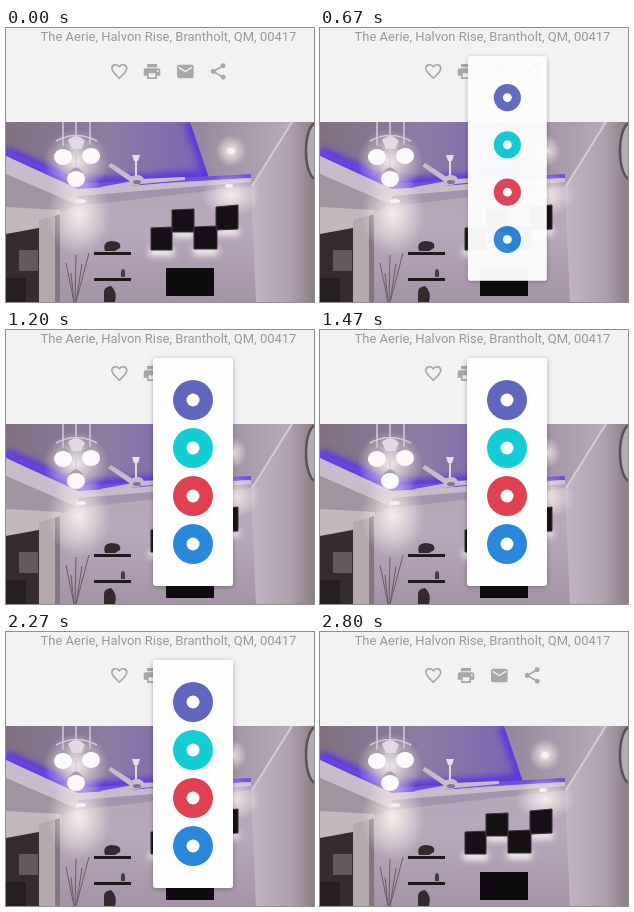
Write an HTML page that moves like this. It is 308 by 274 pixels and loops after 2.87 s.

```html
<!DOCTYPE html>
<html lang="en">
<head>
<meta charset="utf-8">
<title>Share menu</title>
<style>
  html, body { margin: 0; width: 100%; height: 100%; overflow: hidden; background: #f2f2f2; }
  svg { display: block; width: 308px; height: 274px; }
  text { font: 13px Roboto, sans-serif; fill: #999; }
  .line { fill: none; stroke: currentColor; stroke-width: 2; }
</style>
</head>
<body>
<svg viewBox="0 0 308 274">
  <defs>
    <clipPath id="photoArea"><path d="M0 94H308V274H0z"/></clipPath>
    <clipPath id="trayArea"><path d="M0 94H184L203 150L72 164L0 128z"/></clipPath>
    <filter id="soft" x="-40%" y="-100%" width="180%" height="300%"><feGaussianBlur stdDeviation="3"/></filter>
    <filter id="shadow" x="-20%" y="-10%" width="140%" height="120%">
      <feDropShadow dx="0" dy="1" stdDeviation="2.5" flood-opacity=".3"/>
    </filter>
    <linearGradient id="wall" x2="0" y2="1">
      <stop stop-color="#b3a3b5"/><stop offset=".6" stop-color="#b8a8bb"/><stop offset="1" stop-color="#a493a6"/>
    </linearGradient>
    <linearGradient id="ceiling">
      <stop stop-color="#94859b"/><stop offset="1" stop-color="#b9abb9"/>
    </linearGradient>
    <linearGradient id="tray">
      <stop stop-color="#807080"/><stop offset=".5" stop-color="#8d7ca3"/><stop offset="1" stop-color="#7864b4"/>
    </linearGradient>
    <linearGradient id="side">
      <stop stop-color="#c3b5c5"/><stop offset=".6" stop-color="#b0a1ae"/><stop offset="1" stop-color="#8d7f86"/>
    </linearGradient>
    <radialGradient id="glow">
      <stop stop-color="#fff6f0" stop-opacity=".9"/><stop offset="1" stop-color="#fff6f0" stop-opacity="0"/>
    </radialGradient>
  </defs>

  <rect width="308" height="274" fill="#f2f2f2"/>
  <text x="162.5" y="13" text-anchor="middle">The Aerie, Halvon Rise, Brantholt, QM, 00417</text>

  <g color="#a8a8a8" fill="currentColor">
    <path class="line" transform="translate(113.3 43.5) scale(.83) translate(-12 -12)"
      d="M12 20C6 14.6 3 11.8 3 8.4C3 3.6 9 2.3 12 6.2C15 2.3 21 3.6 21 8.4C21 11.8 18 14.6 12 20z"/>
    <path transform="translate(146 43.5) scale(.83) translate(-12 -12)" fill-rule="evenodd"
      d="M6 3H18V7H6zM5 8H19Q22 8 22 11V17H18V21H6V17H2V11Q2 8 5 8zM8 14V19H16V14zM18 10.5H20V12.5H18z"/>
    <path transform="translate(179.3 43.5) scale(.83) translate(-12 -12)" fill-rule="evenodd"
      d="M4 4H20Q22 4 22 6V18Q22 20 20 20H4Q2 20 2 18V6Q2 4 4 4zM4 6V8L12 13L20 8V6L12 11z"/>
  </g>
  <g id="shareIcon" fill="currentColor" transform="translate(212.2 43.5) scale(.83) translate(-12 -12)">
    <path class="line" d="M18 5L6 12L18 19"/>
    <circle cx="18" cy="5" r="3"/><circle cx="6" cy="12" r="3"/><circle cx="18" cy="19" r="3"/>
  </g>

  <g clip-path="url(#photoArea)">
    <path d="M0 94H308V274H0z" fill="url(#wall)"/>
    <path d="M184 94H286L245 158V148L203 150z" fill="url(#ceiling)"/>
    <path d="M0 94H184L203 150L72 164L0 128z" fill="url(#tray)"/>
    <g clip-path="url(#trayArea)">
      <path d="M0 124L72 156L203 148L184 94" fill="none" stroke="#5f38dc" stroke-width="12" filter="url(#soft)"/>
    </g>
    <path d="M0 124L68 154" stroke="#6a42e6" stroke-width="4"/>
    <path d="M66 158L245 148" stroke="#7350dc" stroke-width="4"/>
    <path d="M0 128L72 161L245 150V156L72 177L0 146z" fill="#c8bbcb"/>
    <path d="M72 168L245 154V158L72 178z" fill="#a393ad"/>
    <path d="M0 146L72 177L55 184L0 180z" fill="#a2949f"/>
    <path d="M0 179L55 182V194L0 206z" fill="#c4b8bf"/>
    <path d="M286 94H308V274H250L245 160z" fill="url(#side)"/>
    <path d="M286 94L246 158" stroke="#d6cad6" stroke-width="2"/>

    <path d="M0 206L33 200V274H0z" fill="#352c2e"/>
    <path d="M13 222H32V243H13z" fill="#655a5b"/>
    <path d="M0 250H20V274H0z" fill="#251f20"/>
    <path d="M33 192L54 186V274H33z" fill="#b5a9b0"/>
    <path d="M49 188L54 186V274H49z" fill="#85777d"/>

    <g fill="url(#glow)">
      <ellipse cx="73" cy="186" rx="32" ry="42"/>
      <ellipse cx="225" cy="167" rx="30" ry="22"/>
      <circle cx="225" cy="123" r="16"/>
      <circle cx="70" cy="134" r="33"/>
    </g>
    <g fill="#f8f1f4">
      <path filter="url(#soft)" d="M143 220H168V228H143zM166 202H189V209H166zM187 219H212V227H187zM209 200H233V207H209z"/>
      <ellipse cx="225" cy="123" rx="4" ry="3"/>
      <ellipse cx="223" cy="158" rx="4" ry="2"/>
      <ellipse cx="75" cy="173" rx="5" ry="2"/>
    </g>
    <path d="M145 200L166 199V222H145zM166 182L188 181V204H166zM188 199L211 198V221H188zM210 179L232 177V201L210 202z"
      fill="#161115" stroke="#39313a"/>

    <path d="M88 224H125V227H88zM88 250H125V253H88z" fill="#1f191d"/>
    <path d="M99 223Q96 214 105 213Q116 213 114 220L109 223zM98 274V264Q98 259 105 258Q112 264 109 274z" fill="#332a30"/>
    <path d="M115 249V243Q117 239 119 243V249z" fill="#463b42"/>
    <path d="M68 274L60 235M69 274L70 227M70 274L83 225M70 274L76 236M68 274L65 245"
      fill="none" stroke="#6b5c64" stroke-width="1"/>

    <path d="M160 240H208V268H160z" fill="#0f0c10"/>

    <path d="M130 128V150" stroke="#e0d9e4" stroke-width="2"/>
    <path d="M130 151L105 135L102 138L126 155zM128 153L94 159L100 162L130 157zM134 151L179 149V152L135 156z" fill="#c6bbca"/>
    <path d="M126 127H134L132 133H128z" fill="#e5dee8"/>
    <ellipse cx="131" cy="152" rx="7" ry="5" fill="#c7bdcb"/>
    <ellipse cx="131" cy="154" rx="4" ry="2" fill="#81758a"/>

    <path d="M57 94V122M70 94V143M84 94V121M50 113Q70 102 91 113" fill="none" stroke="#d5ccd6" stroke-width="1.5"/>
    <path d="M50 123Q57 112 64 123zM77 122Q84 111 91 122zM63 145Q70 134 77 145z" fill="#aa9fad"/>
    <path d="M62 112Q71 104 79 113L75 121H66z" fill="#e1dae3"/>
    <g fill="#fbf9fb">
      <ellipse cx="57" cy="129" rx="9" ry="8"/><ellipse cx="85" cy="128" rx="9" ry="8"/><ellipse cx="70" cy="151" rx="9" ry="8"/>
    </g>
    <ellipse cx="310" cy="123" rx="10" ry="28" fill="#b5abb2" stroke="#5b5159" stroke-width="2.5"/>
  </g>

  <g id="menu">
    <rect x="147" y="28" width="80" height="228" rx="3" fill="#fdfdfd" filter="url(#shadow)"/>
    <g id="buttons"></g>
  </g>
</svg>
<script>
const LOOP = 2870;
const find = id => document.getElementById(id);
const clamp = x => Math.max(0, Math.min(1, x));
const ramp = (t, from, to) => {
  const p = clamp((t - from) / (to - from));
  return p * p * (3 - 2 * p);
};
const mix = (a, b, p) => a.map((v, i) => Math.round(v + (b[i] - v) * p));

const buttons = ["#5f66bb", "#12cdd4", "#e04152", "#2a88dc"].map((color, i) => {
  const g = document.createElementNS("http://www.w3.org/2000/svg", "g");
  g.innerHTML = `<circle r="20" fill="${color}"/><circle r="6.5" fill="#fff"/>`;
  find("buttons").append(g);
  return { g, y: 70 + 48 * i };
});

function render(t) {
  const hover = ramp(t, 130, 300) * (1 - ramp(t, 560, 760));
  const open = ramp(t, 450, 700) * (1 - ramp(t, 2400, 2680));

  find("shareIcon").setAttribute("color", `rgb(${mix([168, 168, 168], [40, 40, 58], hover)})`);

  const scale = 0.6 + 0.4 * open;
  find("menu").setAttribute("opacity", open);
  find("menu").setAttribute("transform", `translate(212 43.5) scale(${scale}) translate(-212 -43.5)`);

  const grow = t > 560 ? 1 - Math.exp((560 - t) / 95) : 0;
  for (const { g, y } of buttons) g.setAttribute("transform", `translate(187 ${y}) scale(${grow})`);
}

const start = performance.now();
function tick() {
  render((performance.now() - start) % LOOP);
  requestAnimationFrame(tick);
}
tick();
</script>
</body>
</html>
```
